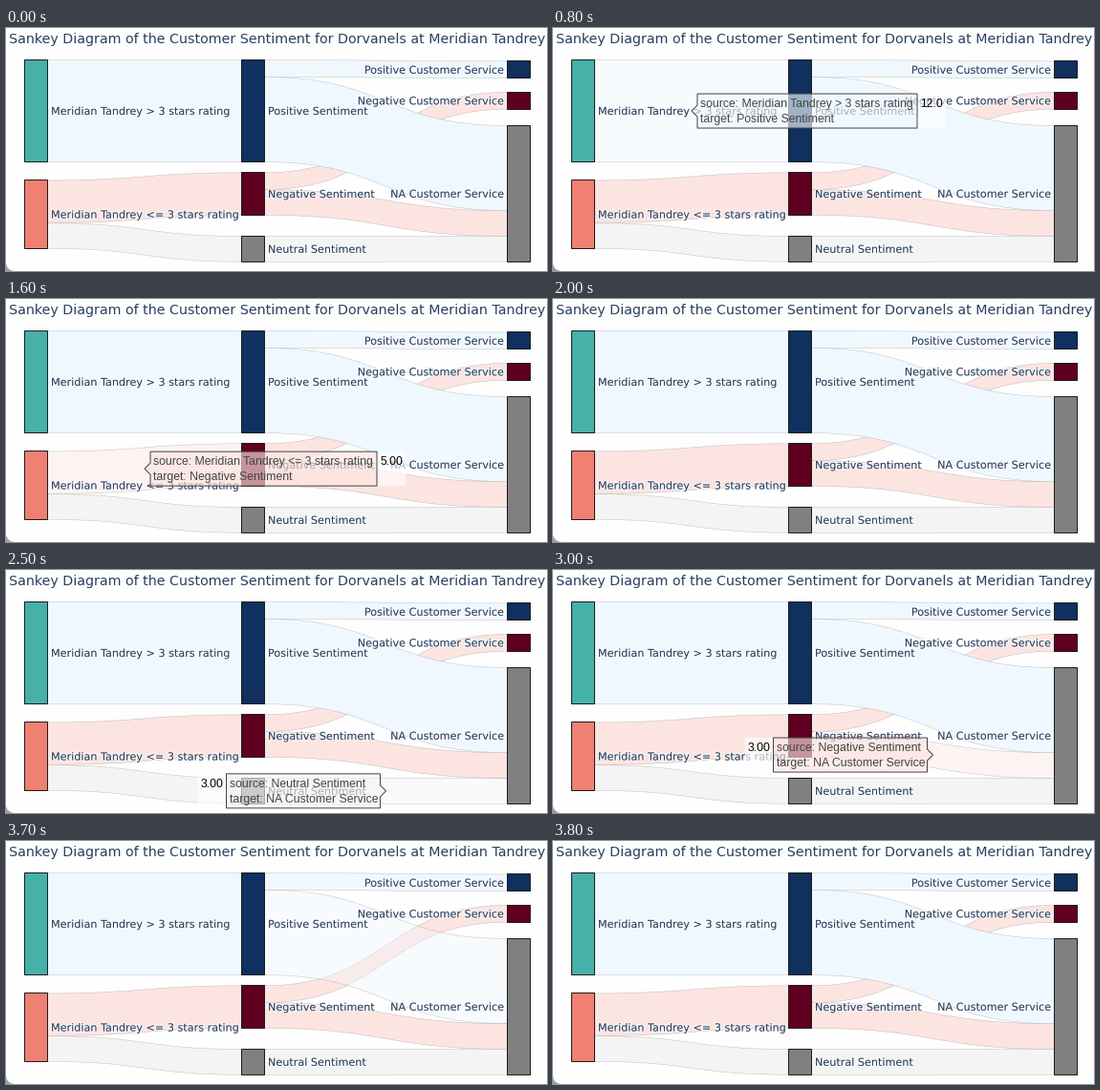
A matplotlib script for the animation above (4700 ms loop, 566 px wide and 255 px high).

```python
import matplotlib.pyplot as plt
from matplotlib.animation import FuncAnimation
from matplotlib.colors import to_rgba
from matplotlib.patches import PathPatch, Polygon, Rectangle
from matplotlib.path import Path
from matplotlib.patheffects import withStroke

W, H, DPI = 566, 255, 64
PT = 72 / DPI          # points per pixel
STEP, LOOP = 100, 4700
UNIT = 8.92            # pixels per counted review
NODE_W = 24
INK = "#2a3f5f"
BLUE, ROSE, SMOKE = "#f0f8ff", "#fce4e1", "#f4f4f4"
SHOP, PLACE = "Dorvanels", "Meridian Tandrey"

fig = plt.figure(figsize=(W / DPI, H / DPI), dpi=DPI, facecolor="#fefefe")
ax = fig.add_axes([0, 0, 1, 1])
ax.set(xlim=(0, W), ylim=(H, 0))
ax.axis("off")

# name: (x, top, count, colour, label)
NODES = {
    "high": (19.5, 33.5, 12, "#45b1a9", f"{PLACE} > 3 stars rating"),
    "low": (19.5, 159.9, 8, "#f08072", f"{PLACE} <= 3 stars rating"),
    "pos": (246.5, 33.5, 12, "#103060", "Positive Sentiment"),
    "neg": (246.5, 151.8, 5, "#600020", "Negative Sentiment"),
    "neu": (246.5, 218.5, 3, "#808080", "Neutral Sentiment"),
    "pos_cs": (524.5, 34.9, 2, "#103060", "Positive Customer Service"),
    "neg_cs": (524.5, 67.4, 2, "#600020", "Negative Customer Service"),
    "na_cs": (524.5, 102.5, 16, "#808080", "NA Customer Service"),
}

# (start, end, count, offset at start, offset at end, colour)
LINKS = [
    ("high", "pos", 12, 0, 0, BLUE),
    ("low", "neg", 5, 0, 0, ROSE),
    ("low", "neu", 3, 5, 0, SMOKE),
    ("neg", "neg_cs", 2, 0, 0, ROSE),
    ("neg", "na_cs", 3, 2, 10, ROSE),
    ("neu", "na_cs", 3, 0, 13, SMOKE),
    ("pos", "pos_cs", 2, 0, 0, BLUE),
    ("pos", "na_cs", 10, 2, 0, BLUE),
]

# (label from, label to, fade to, link, box width, value)
HOVERS = [
    (800, 1500, 1500, 0, 230, "12.0"),
    (1600, 2000, 2000, 1, 237, "5.00"),
    (2500, 2900, 2900, 5, 161, "3.00"),
    (3000, 3300, 3300, 4, 161, "3.00"),
    (3300, 3700, 3800, 7, 161, "10.0"),
]


def write(x, y, text, size, color=INK, font="DejaVu Sans", **kw):
    return ax.text(x, y, text, fontsize=size * PT, color=color,
                   family=font, va="baseline", **kw)


def ribbon(start, end, count, off0, off1, color):
    x0, y0 = NODES[start][0] + NODE_W, NODES[start][1] + off0 * UNIT
    x1, y1 = NODES[end][0], NODES[end][1] + off1 * UNIT
    mid, h = (x0 + x1) / 2, count * UNIT
    verts = [(x0, y0), (mid, y0), (mid, y1), (x1, y1), (x1, y1 + h),
             (mid, y1 + h), (mid, y0 + h), (x0, y0 + h), (x0, y0)]
    codes = ([Path.MOVETO] + [Path.CURVE4] * 3 + [Path.LINETO]
             + [Path.CURVE4] * 3 + [Path.CLOSEPOLY])
    patch = PathPatch(Path(verts, codes), fc=color, ec=to_rgba("#444", 0.3),
                      lw=0.5 * PT, zorder=1)
    return ax.add_patch(patch), mid, (y0 + y1 + h) / 2


def draw_node(x, top, count, color, label):
    h = count * UNIT
    # snapping adds half a pixel to the outline
    ax.add_patch(Rectangle((x - 0.5, top - 0.5), NODE_W, h, fc=color,
                           ec="#1c1c1c", lw=PT, zorder=2))
    last = x > W / 2
    write(x - 2.5 if last else x + NODE_W + 3.5, top + h / 2 + 4, label, 11.2,
          ha="right" if last else "left", zorder=3,
          path_effects=[withStroke(linewidth=2.4 * PT, foreground="#ffffffaa")])


def tooltip(link, width, value):
    """Hover label pointing at the middle of a link, with its value beside."""
    start, end, *_, color = LINKS[link]
    _, x, y = ribbons[link]
    side = 1 if x < W / 2 else -1
    near = x + 6 * side
    far = near + width * side
    left = min(near, far)
    shape = [(x, y), (near, y - 6), (near, y - 18), (far, y - 18),
             (far, y + 18), (near, y + 18), (near, y + 6)]
    name_x = far if side > 0 else far - 29.5
    font = dict(size=12.2, font="Liberation Sans", zorder=6)
    return [
        ax.add_patch(Rectangle((name_x, y - 18), 29.5, 36, lw=0,
                               fc=to_rgba("white", 0.65), zorder=4)),
        ax.add_patch(Polygon(shape, fc=to_rgba(color, 0.65), ec="#444",
                             lw=PT, zorder=5)),
        write(left + 3, y - 4, f"source: {NODES[start][4]}", color="#444", **font),
        write(left + 3, y + 12, f"target: {NODES[end][4]}", color="#444", **font),
        write(name_x + 3, y - 4, value, color="black", **font),
    ]


write(3, 16, f"Sankey Diagram of the Customer Sentiment for {SHOP} at {PLACE}",
      14.2)
ribbons = [ribbon(*link) for link in LINKS]
for node in NODES.values():
    draw_node(*node)
tips = [tooltip(*hover[3:]) for hover in HOVERS]

# rounded window corner
ax.add_patch(PathPatch(
    Path([(0, 247), (1, 254), (8, 255), (0, 255), (0, 247)],
         [Path.MOVETO, Path.CURVE3, Path.CURVE3, Path.LINETO, Path.CLOSEPOLY]),
    fc="#a0a0a0", lw=0))


def update(i):
    t = i * STEP
    faded = {link for begin, _, end, link, *_ in HOVERS if begin <= t < end}
    for k, (patch, *_) in enumerate(ribbons):
        patch.set_facecolor(to_rgba(LINKS[k][5], 0.4 if k in faded else 1))
    for (begin, end, *_), parts in zip(HOVERS, tips):
        for part in parts:
            part.set_visible(begin <= t < end)
    return []


anim = FuncAnimation(fig, update, frames=LOOP // STEP, interval=STEP,
                     repeat=True, repeat_delay=0)
plt.show()
```
